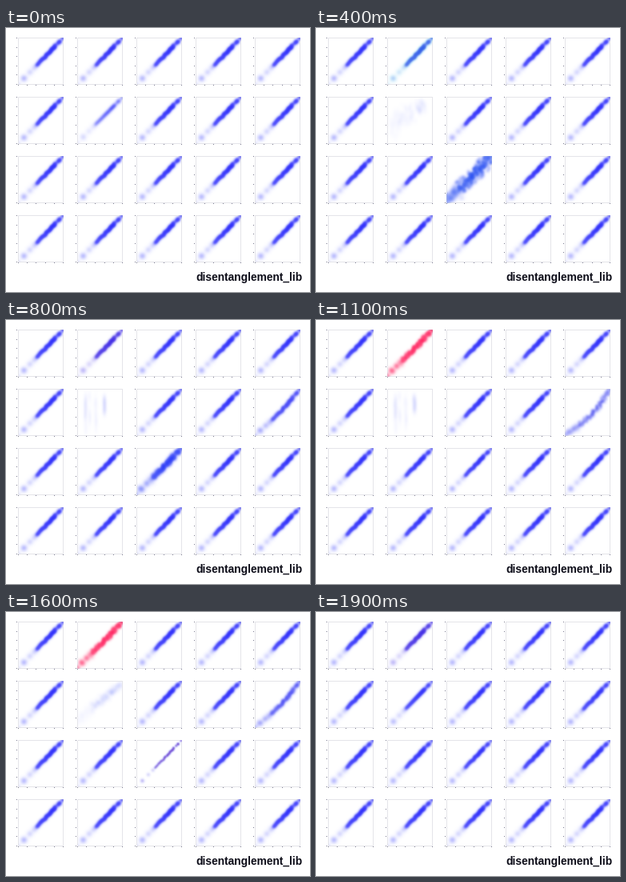
Animation, 380 px wide and 330 px high, one loop 2000 ms. Source, as a matplotlib script:

```python
import numpy as np
import matplotlib.pyplot as plt
from matplotlib.animation import FuncAnimation

W, H, DPI = 380, 330, 100
FRAMES, STEP = 20, 100
PW, PH = 57, 59
COLS = [15, 89, 163, 237, 311]
ROWS = [12, 86, 160, 234]
BLUE = (20, 20, 250)
PALE = (115, 125, 252)

rng = np.random.default_rng(7)

# Positions along the diagonal: loose blobs first, then a dense band.
SPLIT, BAND = 8, 17
band = np.linspace(0.41, 0.83, BAND)
u = np.concatenate([[0.0, 0.13, 0.26, 0.36], band, [0.88, 0.92, 0.99]])
w = np.concatenate([[0.2, 0.42, 0.24, 0.26], np.linspace(0.55, 0.95, BAND), [0.75, 1.2, 0.85]])
sig = np.concatenate([[2.4, 3.0, 2.9, 2.8], np.full(BAND, 2.0), [2.0, 2.1, 2.0]])
shift = np.concatenate([np.zeros(4), rng.normal(0, 0.009, BAND), np.zeros(3)])
u, w, sig, shift = (np.repeat(a, SPLIT) for a in (u, w, sig, shift))
w = w / SPLIT
N = len(u)
along, across = rng.normal(0, 1, (2, N))
across = np.clip(across, -2, 2)
lift = rng.uniform(0.05, 0.95, N)
uniform = np.linspace(0.02, 1.0, N)

gx = np.arange(PW)[None, :]
gy = np.arange(PH)[None, :]


def wave(f, peak):
    return np.cos(2 * np.pi * (f - peak) / FRAMES)


def lerp(a, b, t):
    return a + (b - a) * t


def density(x, y, weight, sx, sy):
    ex = np.exp(-((gx - (x * (PW - 1))[:, None]) / sx[:, None]) ** 2 / 2)
    ey = np.exp(-((gy - ((1 - y) * (PH - 1))[:, None]) / sy[:, None]) ** 2 / 2)
    return (ey * weight[:, None]).T @ ex


def tint(d, core=BLUE, edge=PALE):
    a = (1 - np.exp(-d))[..., None]
    ink = lerp(np.array(edge, float), np.array(core, float), np.clip(a * 1.5, 0, 1))
    return lerp(255.0, ink, a)


def diagonal(spread=0.005, bend=0.0, size=1.0, weight=1.0, jitter=0.004, even=0.0):
    """Points along the diagonal; `even` fills the gaps, `bend` bows it down."""
    pos = lerp(u, uniform, even)
    mass = lerp(w, w.mean(), even) * weight
    off = shift * size + spread * across + bend * np.sin(np.pi * pos)
    x, y = pos + jitter * along + off, pos + jitter * along - off
    return density(x, y, mass, sig * size, sig * size)


def mix(t, stops, colors):
    return [np.interp(t, stops, ch) for ch in zip(*colors)]


def hue_panel(f):
    h = wave(f, 13.5)
    stops = [-1, -0.5, -0.15, 0.3, 0.7, 1]
    core = mix(h, stops, [(22, 75, 228), BLUE, (42, 18, 225),
                          (185, 25, 195), (255, 25, 90), (240, 85, 45)])
    edge = mix(h, stops, [(90, 205, 238), PALE, (140, 130, 245),
                          (225, 120, 225), (255, 90, 140), (250, 150, 80)])
    k = np.clip((h + 0.15) / 0.85, 0, 1)
    d = diagonal(lerp(0.005, 0.022, k), 0, lerp(1, 0.88, k), lerp(1, 2.1, k), 0.004, 0.35 * k)
    return tint(d, core, edge)


def scatter_panel(f):
    p = (1 + wave(f, 9)) / 2
    gather = np.clip((p - 0.2) / 0.7, 0, 1)
    even = 0.7 * np.clip(p / 0.4, 0, 1)
    pos, mass = lerp(u, uniform, even), lerp(w, w.mean(), even)
    stripe = np.select([u < 0.54, u < 0.6, u < 0.72], [0.18, 0.27, 0.41], 0.6)
    high = np.where(u < 0.72, lift, 0.45 + 0.4 * lift)
    fuzz = 0.04 * across * np.sin(np.pi * p)
    x = lerp(pos, stripe + 0.012 * along, gather) + fuzz
    y = lerp(pos, high, p) + 0.1 * np.sin(np.pi * p) * np.sin(np.pi * pos) - fuzz
    weight = 0.09 + 0.8 * np.exp(-3.8 * np.sqrt(p))
    d = density(x, y, mass * weight, lerp(sig, 1.7, p), lerp(sig, 4.0, p))
    return tint(d, mix(p, [0, 0.3, 1], [BLUE, (60, 100, 240), (110, 115, 235)]))


def bend_panel(f):
    c = ((1 + wave(f, 12.5)) / 2) ** 2
    d = diagonal(lerp(0.005, 0.026, c), 0.075 * c, lerp(1, 0.85, c),
                 lerp(1, 1.3, c), lerp(0.004, 0.015, c), 0.75 * c)
    return tint(d, mix(c, [0, 1], [BLUE, (55, 60, 235)]))


def width_panel(f):
    q = wave(f, 5)
    wide, thin = max(q, 0) ** 2, max(-q, 0) ** 2
    d = diagonal(0.005 + 0.057 * wide, 0, 1 - 0.42 * thin,
                 1 + 2 * wide, 0.004 + 0.02 * wide, 0.6 * wide)
    core = mix(q, [-1, -0.3, 0.3, 1], [(85, 38, 200), BLUE, BLUE, (28, 72, 240)])
    return tint(d, core)


def draw_frame_lines(img, x, y):
    edge = np.array([228, 228, 233])
    for row in (y, y + PH - 1):
        img[row, x:x + PW] = np.minimum(img[row, x:x + PW], edge)
    for col in (x, x + PW - 1):
        img[y:y + PH, col] = np.minimum(img[y:y + PH, col], edge)
    for t in np.linspace(0, 1, 6):
        img[y + round(t * (PH - 1)), x - 2] = (125, 125, 145)
        img[y + PH, x + round(t * (PW - 1))] = (125, 125, 145)


PLAIN = tint(diagonal())
ACTIVE = {(0, 1): hue_panel, (1, 1): scatter_panel,
          (1, 4): bend_panel, (2, 2): width_panel}


def stage(f):
    img = np.full((H, W, 3), 255.0)
    for r, y in enumerate(ROWS):
        for c, x in enumerate(COLS):
            panel = ACTIVE.get((r, c))
            img[y:y + PH, x:x + PW] = panel(f) if panel else PLAIN
            draw_frame_lines(img, x, y)
    return np.clip(img, 0, 255).round().astype(np.uint8)


fig = plt.figure(figsize=(W / DPI, H / DPI), dpi=DPI, facecolor="white")
ax = fig.add_axes([0, 0, 1, 1])
ax.axis("off")
view = ax.imshow(stage(0), extent=(0, W, H, 0), interpolation="nearest", aspect="auto")
ax.text(370.5, 316, "disentanglement_lib", family="Liberation Sans", weight="bold",
        size=13.7 * 72 / DPI, color="#0c0c18", ha="right", va="baseline")


def update(f):
    view.set_data(stage(f))
    return [view]


anim = FuncAnimation(fig, update, frames=FRAMES, interval=STEP,
                     repeat=True, repeat_delay=0, blit=False)
plt.show()
```
